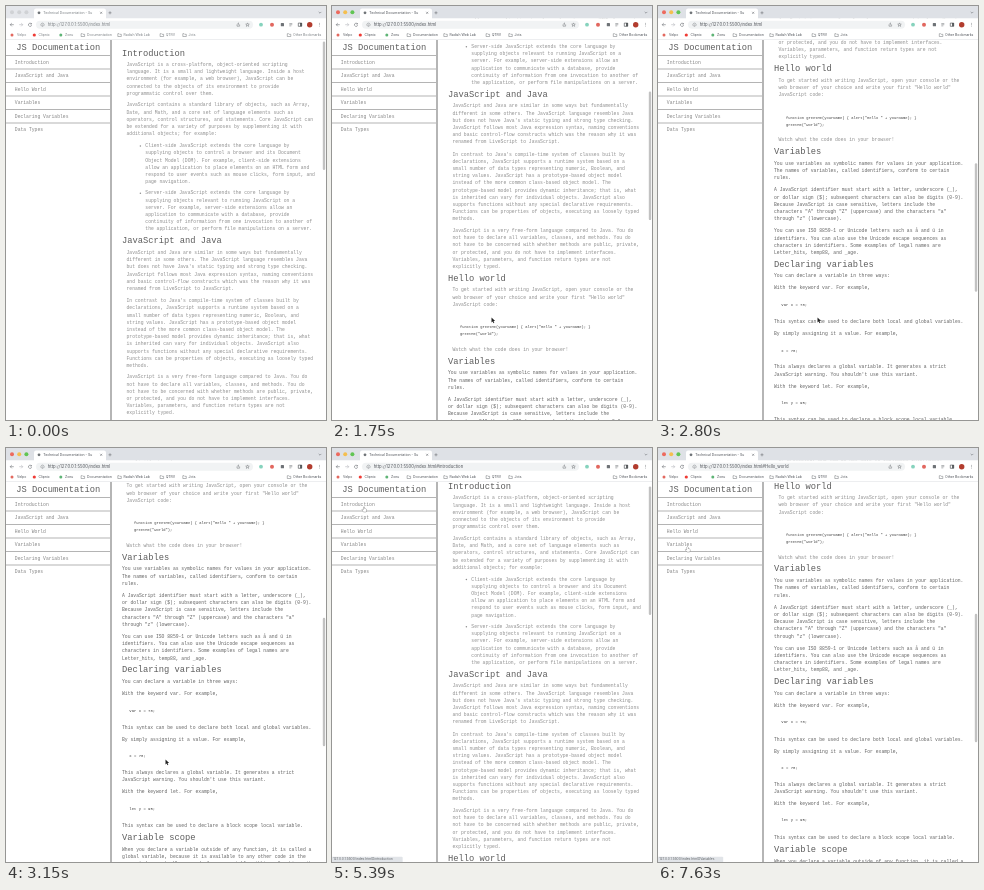
An HTML page with a canvas for the animation above (8 s loop, 320 by 414 pixels).

```html
<!DOCTYPE html>
<html lang="en">
<head>
<meta charset="utf-8">
<title>JS Documentation</title>
<style>
html, body { margin: 0; width: 100%; height: 100%; overflow: hidden; background: #fff; }
canvas { display: block; width: 320px; height: 414px; }
</style>
</head>
<body>
<canvas id="stage"></canvas>
<script>
const W = 320, H = 414, TOP = 34, LOOP = 8000, STEP = 70, FOCUS = 140;
const MONO = '"Liberation Mono", monospace', SANS = 'Inter, sans-serif';
const LINE = 7.2, BODY = 4.71, HEAD = 8.74;
const SOFT = '#8e8e8e', DARK = '#626262', INK = '#5c5c5c', CODE = '#3c3c3c', ICON = '#6f7377';

const canvas = document.getElementById('stage');
const ctx = canvas.getContext('2d');
const dpr = window.devicePixelRatio || 1;
canvas.width = W * dpr;
canvas.height = H * dpr;

// Page blocks: [style, y of first line at scroll 0, lines separated by |]
const page = [
  ['head', 47, 'Introduction'],
  ['soft', 58.5, 'JavaScript is a cross-platform, object-oriented scripting|language. It is a small and lightweight language. Inside a host|environment (for example, a web browser), JavaScript can be|connected to the objects of its environment to provide|programmatic control over them.'],
  ['soft', 99, 'JavaScript contains a standard library of objects, such as Array,|Date, and Math, and a core set of language elements such as|operators, control structures, and statements. Core JavaScript can|be extended for a variety of purposes by supplementing it with|additional objects; for example:'],
  ['item', 139.7, 'Client-side JavaScript extends the core language by|supplying objects to control a browser and its Document|Object Model (DOM). For example, client-side extensions|allow an application to place elements on an HTML form and|respond to user events such as mouse clicks, form input, and|page navigation.'],
  ['item', 187, 'Server-side JavaScript extends the core language by|supplying objects relevant to running JavaScript on a|server. For example, server-side extensions allow an|application to communicate with a database, provide|continuity of information from one invocation to another of|the application, or perform file manipulations on a server.'],
  ['head', 234.5, 'JavaScript and Java'],
  ['soft', 246.5, 'JavaScript and Java are similar in some ways but fundamentally|different in some others. The JavaScript language resembles Java|but does not have Java\'s static typing and strong type checking.|JavaScript follows most Java expression syntax, naming conventions|and basic control-flow constructs which was the reason why it was|renamed from LiveScript to JavaScript.'],
  ['soft', 294.7, 'In contrast to Java\'s compile-time system of classes built by|declarations, JavaScript supports a runtime system based on a|small number of data types representing numeric, Boolean, and|string values. JavaScript has a prototype-based object model|instead of the more common class-based object model. The|prototype-based model provides dynamic inheritance; that is, what|is inherited can vary for individual objects. JavaScript also|supports functions without any special declarative requirements.|Functions can be properties of objects, executing as loosely typed|methods.'],
  ['soft', 371, 'JavaScript is a very free-form language compared to Java. You do|not have to declare all variables, classes, and methods. You do|not have to be concerned with whether methods are public, private,|or protected, and you do not have to implement interfaces.|Variables, parameters, and function return types are not|explicitly typed.'],
  ['head', 418.7, 'Hello world'],
  ['soft', 430.4, 'To get started with writing JavaScript, open your console or the|web browser of your choice and write your first "Hello world"|JavaScript code:'],
  ['demo', 467.6, 'function greetMe(yourName) { alert("Hello " + yourName); }|greetMe("World");'],
  ['soft', 489.8, 'Watch what the code does in your browser!'],
  ['head', 501.5, 'Variables'],
  ['dark', 513.4, 'You use variables as symbolic names for values in your application.|The names of variables, called identifiers, conform to certain|rules.'],
  ['dark', 540, 'A JavaScript identifier must start with a letter, underscore (_),|or dollar sign ($); subsequent characters can also be digits (0-9).|Because JavaScript is case sensitive, letters include the|characters "A" through "Z" (uppercase) and the characters "a"|through "z" (lowercase).'],
  ['dark', 581, 'You can use ISO 8859-1 or Unicode letters such as å and ü in|identifiers. You can also use the Unicode escape sequences as|characters in identifiers. Some examples of legal names are|Letter_hits, temp88, and _age.'],
  ['head', 614, 'Declaring variables'],
  ['dark', 626, 'You can declare a variable in three ways:'],
  ['dark', 638, 'With the keyword var. For example,'],
  ['code', 655, 'var x = 78;'],
  ['dark', 672, 'This syntax can be used to declare both local and global variables.'],
  ['dark', 684, 'By simply assigning it a value. For example,'],
  ['code', 700.7, 'x = 78;'],
  ['dark', 717, 'This always declares a global variable. It generates a strict|JavaScript warning. You shouldn\'t use this variant.'],
  ['dark', 736.5, 'With the keyword let. For example,'],
  ['code', 753, 'let y = 95;'],
  ['dark', 770, 'This syntax can be used to declare a block scope local variable.'],
  ['head', 782, 'Variable scope'],
  ['dark', 794, 'When you declare a variable outside of any function, it is called a|global variable, because it is available to any other code in the|current document. When you declare a variable within a function, it|is called a local variable, because it is available only within|that function.'],
  ['dark', 834.6, 'JavaScript before ECMAScript 2015 does not have block statement|scope; rather, a variable declared within a block is local to the|function (or global scope) that the block resides within. For|example the following code will log 5, because the scope of x is|the function (or global context) within which x is declared, not|the block, which in this case is an if statement.'],
  ['code', 887, 'if (true) { var x = 10; } console.log(x); // 10'],
  ['dark', 904, 'This behavior changes, when using the let declaration introduced in|ECMAScript 2015.'],
  ['code', 936, 'if (true) { let y = 5; } console.log(y); // ReferenceError: y is not|defined'],
  ['head', 958, 'Data types'],
  ['dark', 970, 'The latest ECMAScript standard defines seven data types:'],
  ['list', 982, 'Six data types that are primitives:'],
  ['sub', 994, 'Boolean. true and false.'],
  ['sub', 1006, 'null. A special keyword denoting a null value. Because|JavaScript is case-sensitive, null is not the same as|Null, NULL, or any other variant.'],
  ['sub', 1032, 'undefined. A top-level property whose value is|undefined.'],
  ['sub', 1051, 'Number. 78 or 3.14159.'],
  ['sub', 1062.7, 'String. "Hello"'],
  ['sub', 1074.7, 'Symbol (new in ECMAScript 2015). A data type whose|instances are unique and immutable.'],
  ['list', 1093.3, 'and Object.'],
  ['dark', 1105, 'Although these data types are a relatively small amount, they|enable you to perform useful functions with your applications.|Objects and functions are the other fundamental elements in the|language. You can think of objects as named containers for|values, and functions as procedures that your application can|perform.']
];

const styles = {
  head: { x: 116, size: HEAD, color: INK },
  soft: { x: 120.5, size: BODY, color: SOFT },
  dark: { x: 116, size: BODY, color: DARK },
  item: { x: 139.3, size: BODY, color: SOFT, dot: 134.4 },
  list: { x: 133.8, size: BODY, color: DARK, dot: 129.5 },
  sub: { x: 146, size: BODY, color: DARK, dot: 141.8 },
  code: { x: 123.3, size: 3.92, color: CODE },
  demo: { x: 128, size: 3.75, color: CODE }
};

const links = ['Introduction', 'JavaScript and Java', 'Hello World', 'Variables', 'Declaring Variables', 'Data Types'];

// Keyframes: [ms, value...]
const scrollKeys = [
  [1190, 0], [1400, 52], [1470, 52], [1750, 146.5], [1960, 218], [2240, 218],
  [2450, 316], [2520, 316], [2870, 366], [3010, 366], [3150, 392.5], [3290, 560],
  [3640, 560], [3850, 710], [3920, 722]
];
const jumps = [[5390, 8.5, '#introduction'], [6370, 196.5, '#JavaScript_and_Java'], [7280, 380.7, '#Hello_world']];
const cursorKeys = [
  [70, 150, 382], [630, 156, 330], [1050, 159.5, 311.5], [4340, 159.5, 311.5],
  [4970, 32, 59], [5740, 32, 59], [6020, 32, 72.5], [6580, 32, 72.5],
  [7070, 31, 86], [7350, 31, 86], [7630, 29.5, 99]
];
const hints = [[5110, '#introduction'], [5950, '#JavaScript_and_Java'], [6930, '#Hello_world'], [7560, '#Variables']];

function sample(keys, t) {
  if (t <= keys[0][0]) return keys[0].slice(1);
  for (let i = 1; i < keys.length; i++) {
    const a = keys[i - 1], b = keys[i];
    if (t <= b[0]) {
      const k = (t - a[0]) / (b[0] - a[0]);
      return a.slice(1).map((v, j) => v + (b[j + 1] - v) * k);
    }
  }
  return keys[keys.length - 1].slice(1);
}

const latest = (list, t) => list.filter(e => e[0] <= t).pop();

// Text is set large and scaled down so its widths stay fractional.
function text(str, x, y, size, color, font = MONO) {
  const k = size / 40;
  ctx.save();
  ctx.translate(x, y + size * 0.3);
  ctx.scale(k, k);
  ctx.font = '40px ' + font;
  ctx.fillStyle = color;
  ctx.fillText(str, 0, 0);
  ctx.restore();
}

function rect(x, y, w, h, color, r = 0) {
  ctx.fillStyle = color;
  ctx.beginPath();
  ctx.roundRect(x, y, w, h, r);
  ctx.fill();
}

function disc(x, y, r, color) {
  ctx.fillStyle = color;
  ctx.beginPath();
  ctx.arc(x, y, r, 0, Math.PI * 2);
  ctx.fill();
}

function stroke(d, x, y, color = ICON, width = 0.6) {
  ctx.save();
  ctx.translate(x, y);
  ctx.strokeStyle = color;
  ctx.lineWidth = width;
  ctx.stroke(new Path2D(d));
  ctx.restore();
}

function drawPage(scroll) {
  for (const [kind, top, body] of page) {
    const s = styles[kind], y0 = top - scroll;
    if (y0 > H + 10 || y0 < -60) continue;
    if (s.dot) disc(s.dot, y0 + 0.3, 0.75, s.color);
    body.split('|').forEach((str, i) => text(str, s.x, y0 + i * LINE, s.size, s.color));
  }
}

function drawSidebar() {
  rect(104.5, TOP, 1, H - TOP, '#6c6c6c');
  text('JS Documentation', 10.3, 41.5, HEAD, INK);
  links.forEach((name, i) => {
    const y = 56.5 + i * 13.5;
    rect(0, y - 7.4, 104.5, 0.9, '#b4b4b4');
    text(name, 8.8, y, BODY, '#858585');
  });
}

function folder(x) {
  stroke('M-1.7-1.3h1.3l.6.6h1.6v2.2h-3.5z', x, 29, ICON, 0.5);
}

function drawChrome(hash, focused) {
  const label = focused ? '#50545a' : '#7c8085';
  rect(0, 0, W, 12.5, focused ? '#dee1e6' : '#e5e7eb');
  ['#ed6a5e', '#f5bf4f', '#61c554'].forEach((c, i) => disc(6 + i * 7.2, 6.3, 2, focused ? c : '#d0d2d5'));
  rect(28, 2.4, 72, 12, '#fff', 2.2);
  disc(33, 6.8, 1.4, ICON);
  text('Technical Documentation - Su', 37.2, 6.8, 3.45, label, SANS);
  stroke('M-1-1L1 1M1-1L-1 1', 95.2, 6.8);
  stroke('M-1.5 0h3M0-1.5v3', 104, 6.8);
  stroke('M-1.3-.6L0 .7L1.3-.6', 314, 6.5);

  rect(0, 12.4, W, TOP - 12.4, '#fff');
  stroke('M1.8 0h-3.6M-.2-1.6L-1.8 0L-.2 1.6', 6, 18.7);
  stroke('M-1.8 0h3.6M.2-1.6L1.8 0L.2 1.6', 15, 18.7, '#b5b8bc');
  stroke('M1.3-.9A1.6 1.6 0 1 0 1.6 .4M1.5-1.7v1.1h-1.1', 24, 18.7);
  rect(30, 14.7, 217, 8, '#f1f3f4', 4);
  stroke('M0-1.6A1.6 1.6 0 1 1-.01-1.6M0-.2v1.1', 36.5, 18.7, ICON, 0.5);
  text('http://127.0.0.1:5500/index.html' + hash, 41.8, 18.7, 4.27, label, SANS);
  stroke('M-1.3-.3v1.8h2.6v-1.8M0 .5v-2.2M-.7-1L0-1.7L.7-1', 232.3, 18.7, ICON, 0.5);
  stroke('M0-1.8L.5-.5L1.8-.5L.8 .4L1.1 1.7L0 .9L-1.1 1.7L-.8 .4L-1.8-.5L-.5-.5Z', 241.5, 18.7, ICON, 0.5);
  disc(255, 18.7, 1.9, '#86d3bd');
  disc(266, 18.7, 2, '#e2675f');
  rect(274.8, 17.1, 3.2, 3.2, ICON, 0.6);
  stroke('M-1.5-1.2h3M-1.5 0h3M-1.5 1.2h2', 284.8, 18.7, ICON, 0.5);
  stroke('M-1.7-1.6h3.4v3.2h-3.4z', 294, 18.7, '#3c4043', 0.6);
  rect(294.2, 17.1, 1.5, 3.2, '#3c4043');
  disc(303.7, 18.7, 2.7, '#b23c2e');
  for (let i = -1; i < 2; i++) disc(313.5, 18.7 + i * 1.4, 0.45, ICON);

  disc(6, 29, 1.5, '#e3695f');
  disc(28.3, 29, 1.6, '#ef3b35');
  disc(54.8, 29, 1.5, '#5fb476');
  [76.8, 113.5, 155.8, 178.5, 283].forEach(folder);
  [['Velpo', 11], ['Clipnix', 32.5], ['Zonu', 59], ['Documentation', 81],
   ['Radish Web Lab', 117.5], ['QTRV', 159.8], ['Jots', 182.5], ['Other Bookmarks', 287]]
    .forEach(([name, x]) => text(name, x, 29, 3.45, label, SANS));
  rect(0, TOP - 0.6, W, 0.6, '#dcdee1');
}

function drawCursor(x, y, hand) {
  const arrow = 'M0 0v5l1.2-1.1l.8 1.8l.8-.4l-.8-1.7h1.6z';
  const pointer = 'M-.5 0q.5-.5 1 0v2l1.9 .5q.5 .2 .4 .8l-.4 2h-3l-1.6-2.2q.2-.8 1 -.2l.7 .5z';
  const shape = new Path2D(hand ? pointer : arrow);
  ctx.save();
  ctx.translate(x, y);
  if (hand) ctx.scale(0.9, 0.9);
  ctx.lineJoin = 'round';
  ctx.lineWidth = hand ? 0.7 : 0.9;
  ctx.strokeStyle = hand ? '#555' : '#fff';
  ctx.fillStyle = hand ? '#fff' : '#222';
  ctx.stroke(shape);
  ctx.fill(shape);
  ctx.restore();
}

function draw(time) {
  const t = Math.floor((time % LOOP) / STEP) * STEP;
  const jump = latest(jumps, t);
  const scroll = jump ? jump[1] : sample(scrollKeys, t)[0];
  const hint = latest(hints, t);

  ctx.setTransform(dpr, 0, 0, dpr, 0, 0);
  rect(0, 0, W, H, '#fff');
  drawPage(scroll);
  drawSidebar();
  rect(316.8, 35.5 + scroll * 0.342, 2.4, 128.5, '#c2c2c2', 1.2);
  drawChrome(jump ? jump[2] : '', t >= FOCUS);
  if (hint) {
    const label = '127.0.0.1:5500/index.html' + hint[1];
    rect(0, 408.8, label.length * 1.82 + 1.5, 5.2, '#e1e4e8', [0, 1, 0, 0]);
    text(label, 1.2, 411.5, 3.3, '#63676b', SANS);
  }
  if (t >= STEP) {
    const [x, y] = sample(cursorKeys, t);
    drawCursor(x, y, t >= 4900);
  }
}

const start = performance.now();
function tick() {
  draw(performance.now() - start);
  requestAnimationFrame(tick);
}
tick();
</script>
</body>
</html>
```
